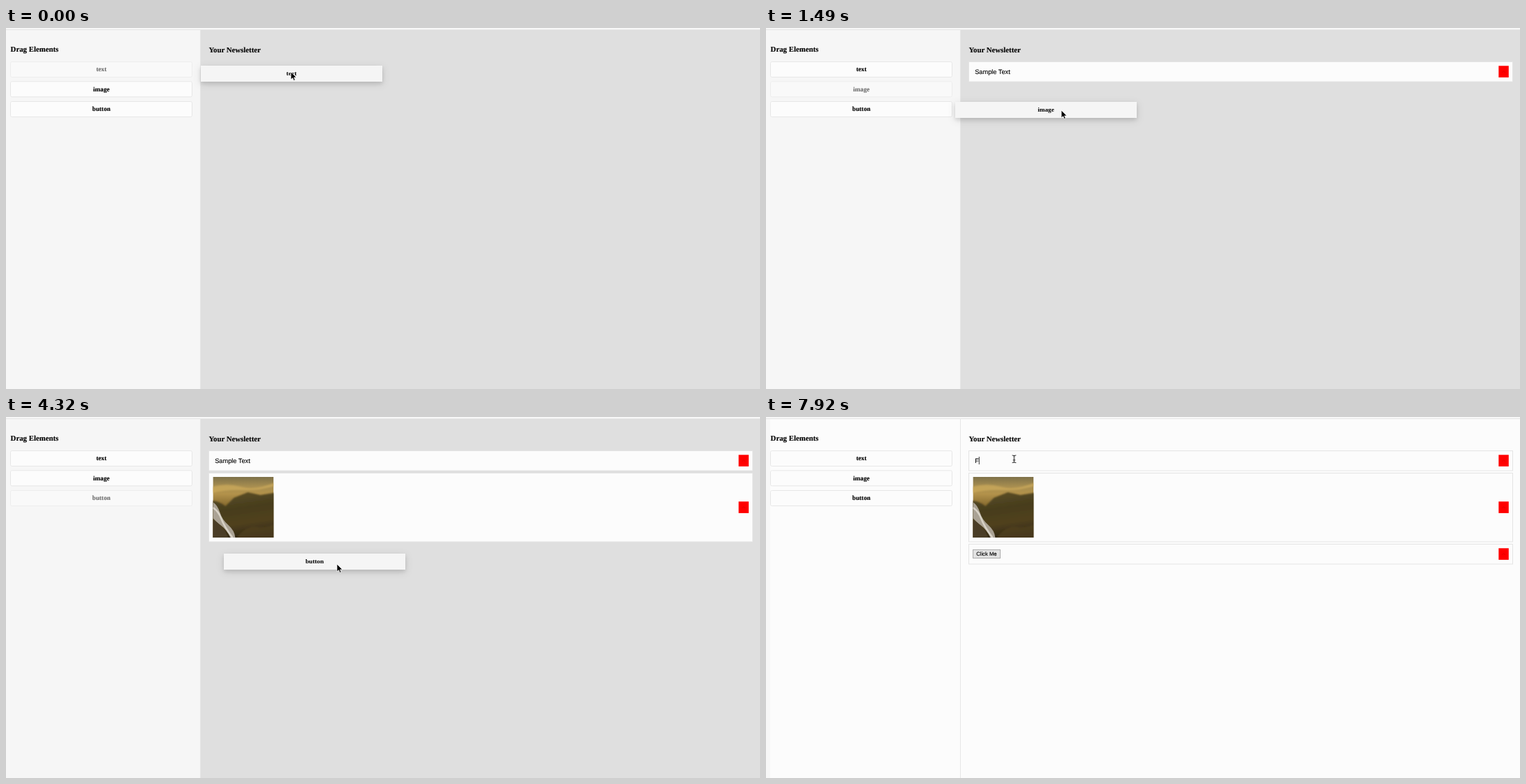
Write an HTML page that moves like this. It is 1080 px wide and 518 px high and loops after 8 s.

```html
<!DOCTYPE html>
<html lang="en">
<head>
<meta charset="utf-8">
<title>Newsletter builder</title>
<style>
html, body { margin: 0; width: 100%; height: 100%; overflow: hidden; background: #f7f7f7; }
svg { display: block; position: absolute; left: 0; top: 0; }
text { text-rendering: geometricPrecision; fill: #000; stroke: #000; stroke-width: .12px; }
.serif { font: bold 9.23px "Liberation Serif", "Times New Roman", serif; }
.mid { text-anchor: middle; }
.title { font-size: 10.8px; }
.sans { font: 9.23px "Liberation Sans", Arial, sans-serif; }
.small { font-size: 7.69px; }
.item rect { fill: #fcfcfc; stroke: #e7e7e7; }
.row { fill: #fcfcfc; stroke: #e4e4e4; }
.ghost div {
  margin: 20px; width: 260px; height: 23px; background: #f5f5f5;
  font: bold 9.23px/23px "Liberation Serif", "Times New Roman", serif; text-align: center;
  box-shadow: 0 3px 6px rgba(0,0,0,.13), 0 3px 12px 2px rgba(0,0,0,.07);
}

.zone, .panel, .item, .ghost, .pic, .plain, .row1, .row2, .row3,
.cursor, .arrow, .hand, .beam, .sample, .typed, .selTail, .selHead {
  animation: 8s step-end infinite;
}
.zone { animation-name: zone; }
.panel { animation-name: panel; }
.item1 { animation-name: fade1; }
.item2 { animation-name: fade2; }
.item3 { animation-name: fade3; }
.ghost1 { animation-name: drag1; }
.ghost2 { animation-name: drag2; }
.ghost3 { animation-name: drag3; }
.row1 { animation-name: row1; }
.row2 { animation-name: row2; }
.plain { animation-name: plain; }
.pic { animation-name: pic; }
.row3 { animation-name: row3; }
.cursor { animation-name: move; }
.arrow { animation-name: arrow; }
.hand { animation-name: hand; }
.beam { animation-name: beam; }
.sample { animation-name: sample; }
.typed { animation-name: typed; }
.selTail { animation-name: selTail; }
.selHead { animation-name: selHead; }

@keyframes zone {
  0%, 16.75%, 48.5% { fill: #dfdfdf; }
  3.625%, 26.125% { fill: #fefefe; }
  59.625%, 100% { fill: #fcfcfc; }
}
@keyframes panel { 0% { fill: #f6f6f6; } 59.625%, 100% { fill: #fcfcfc; } }
@keyframes fade1 { 0% { opacity: .55; } 3.625%, 100% { opacity: 1; } }
@keyframes fade2 { 0%, 26.125%, 100% { opacity: 1; } 16.75% { opacity: .55; } }
@keyframes fade3 { 0%, 59.625%, 100% { opacity: 1; } 48.5% { opacity: .55; } }
@keyframes drag1 { 0% { opacity: 1; } 3.625%, 100% { opacity: 0; } }
@keyframes drag2 { 0%, 26.125%, 100% { opacity: 0; } 16.75% { opacity: 1; } }
@keyframes drag3 { 0%, 59.625%, 100% { opacity: 0; } 48.5% { opacity: 1; } }
@keyframes row1 { 0% { opacity: 0; } 3.625%, 100% { opacity: 1; } }
@keyframes row2 { 0% { opacity: 0; } 26.125%, 100% { opacity: 1; } }
@keyframes plain { 0% { opacity: 1; } 31.75%, 100% { opacity: 0; } }
@keyframes pic { 0% { opacity: 0; } 31.75%, 100% { opacity: 1; } }
@keyframes row3 { 0% { opacity: 0; } 59.625%, 100% { opacity: 1; } }
@keyframes sample { 0% { opacity: 1; } 99%, 100% { opacity: 0; } }
@keyframes typed { 0% { opacity: 0; } 99%, 100% { opacity: 1; } }
@keyframes selTail { 0%, 99%, 100% { opacity: 0; } 85.875% { opacity: 1; } }
@keyframes selHead { 0%, 99%, 100% { opacity: 0; } 87.75% { opacity: 1; } }
@keyframes arrow {
  0%, 16.75%, 48.5% { opacity: 1; }
  3.625%, 26.125%, 59.625%, 100% { opacity: 0; }
}
@keyframes hand {
  0%, 16.75%, 48.5%, 82.125%, 100% { opacity: 0; }
  3.625%, 26.125%, 59.625% { opacity: 1; }
}
@keyframes beam { 0% { opacity: 0; } 82.125%, 100% { opacity: 1; } }
@keyframes move {
  0% { transform: translate(408px, 63px); }
  1.875% { transform: translate(409px, 63px); }
  3.625% { transform: translate(408px, 63px); }
  7.375% { transform: translate(340px, 61px); }
  9.25% { transform: translate(215px, 82px); }
  11.125% { transform: translate(158px, 90px); }
  16.75% { transform: translate(174px, 91px); }
  18.625% { transform: translate(423px, 118px); }
  20.5% { transform: translate(436px, 108px); }
  22.375% { transform: translate(441px, 102px); }
  24.25%, 26.125% { transform: translate(443px, 100px); }
  29.875% { transform: translate(400px, 102px); }
  31.75% { transform: translate(330px, 109px); }
  33.625% { transform: translate(255px, 117px); }
  35.5% { transform: translate(200px, 121px); }
  37.375% { transform: translate(174px, 120px); }
  39.125% { transform: translate(167px, 119px); }
  48.5% { transform: translate(312px, 140px); }
  50.375% { transform: translate(430px, 184px); }
  52.25% { transform: translate(468px, 205px); }
  54%, 59.625% { transform: translate(474px, 211px); }
  74.625% { transform: translate(460px, 200px); }
  76.5% { transform: translate(438px, 160px); }
  78.375% { transform: translate(405px, 104px); }
  80.25% { transform: translate(376px, 66px); }
  82.125% { transform: translate(350px, 50px); }
  84% { transform: translate(354px, 57px); }
  85.875%, 100% { transform: translate(355px, 60px); }
}
</style>
</head>
<body>
<svg width="1080" height="518" viewBox="0 0 1080 518">
  <defs>
    <linearGradient id="sky" x2="0" y2="1">
      <stop offset="0" stop-color="#7d7048"/>
      <stop offset=".15" stop-color="#a68d50"/>
      <stop offset=".28" stop-color="#b3924b"/>
      <stop offset=".5" stop-color="#80652c"/>
    </linearGradient>
    <linearGradient id="hill" x2=".2" y2="1">
      <stop offset="0" stop-color="#5f5128"/>
      <stop offset=".4" stop-color="#473d1d"/>
      <stop offset=".7" stop-color="#51411f"/>
      <stop offset="1" stop-color="#2f2612"/>
    </linearGradient>
    <filter id="soft" x="-.1" y="-.1" width="1.2" height="1.2"><feGaussianBlur stdDeviation="1"/></filter>
    <clipPath id="frame"><rect width="87" height="87"/></clipPath>
    <g id="del">
      <rect x="1049.4" width="14.4" y=".3" height="16.6" fill="#f00"/>
      <path d="M1054.3 10L1056.6 7.6L1058.9 10" fill="none" stroke="#d40000" stroke-width=".7"/>
    </g>
  </defs>

  <rect width="1080" height="518" fill="#f7f7f7"/>
  <rect class="panel" x="6" y="3" width="272" height="515"/>
  <rect class="zone" x="278" y="3" width="802" height="515"/>
  <path d="M0 2.5H1080M278.5 3V518" stroke="#e6e6e6"/>

  <text class="serif title" x="6.6" y="34.2">Drag Elements</text>
  <text class="serif title" x="290.4" y="34.7">Your Newsletter</text>

  <g class="item item1">
    <rect x="6.5" y="48.5" width="260" height="22" rx="2"/>
    <text class="serif mid" x="136.6" y="62.1">text</text>
  </g>
  <g class="item item2">
    <rect x="6.5" y="76.8" width="260" height="22" rx="2"/>
    <text class="serif mid" x="136.6" y="90.7">image</text>
  </g>
  <g class="item item3">
    <rect x="6.5" y="105.5" width="260" height="22" rx="2"/>
    <text class="serif mid" x="136.6" y="119.3">button</text>
  </g>

  <g class="row1">
    <rect class="row" x="290.5" y="48.5" width="779" height="28.5"/>
    <use href="#del" y="54"/>
    <rect class="selTail" x="333" y="57" width="17" height="11" fill="#b3d7ff"/>
    <rect class="selHead" x="299" y="57" width="34" height="11" fill="#b3d7ff"/>
    <text class="sans sample" x="299.2" y="65.6">Sample Text</text>
    <g class="typed">
      <text class="sans" x="299.2" y="65.6">F</text>
      <path d="M305.3 57V68" stroke="#000" stroke-width=".8"/>
    </g>
  </g>

  <g class="row2">
    <g class="plain">
      <rect class="row" x="290.5" y="80.5" width="779" height="28.5"/>
      <use href="#del" y="86"/>
    </g>
    <g class="pic">
      <rect class="row" x="290.5" y="80.5" width="779" height="98.5"/>
      <use href="#del" y="121"/>
      <g transform="translate(296.4 86)" clip-path="url(#frame)">
        <rect width="87" height="87" fill="url(#sky)"/>
        <g filter="url(#soft)">
          <path d="M-4 15Q18 8 40 14T92 7V12Q66 20 42 19T-4 24Z" fill="#d2ae5e" opacity=".65"/>
          <path d="M-4 34Q8 34 18 42L30 30L50 22L68 26L92 22V92H-4Z" fill="url(#hill)"/>
          <path d="M30 92Q46 70 62 72T92 66V92Z" fill="#584520" opacity=".6"/>
        </g>
        <path d="M0 36Q7 41 10 51T22 69T32 87H25Q20 76 12 70T0 59Z" fill="#aaa294"/>
        <path d="M0 44Q8 49 12 60T28 87" fill="none" stroke="#d8d2c6" stroke-width="2.5"/>
        <path d="M0 61Q13 69 22 87H0Z" fill="#4a3d26"/>
      </g>
    </g>
  </g>

  <g class="row3">
    <rect class="row" x="290.5" y="182.5" width="779" height="28.5"/>
    <use href="#del" y="188"/>
    <rect x="296.5" y="190.5" width="39" height="12" fill="#e2e2e2" stroke="#adadad"/>
    <text class="sans small mid" x="315.9" y="199.2">Click Me</text>
  </g>

  <g class="cursor">
    <foreignObject class="ghost ghost1" x="-149" y="-29.5" width="300" height="65"><div>text</div></foreignObject>
    <foreignObject class="ghost ghost2" x="-172" y="-32" width="300" height="65"><div>image</div></foreignObject>
    <foreignObject class="ghost ghost3" x="-182" y="-35" width="300" height="65"><div>button</div></foreignObject>
    <path class="arrow" d="M0 0V11L2.6 8.7L4.2 12.4L6.2 11.6L4.6 8H8Z" stroke="#fff" stroke-width=".8"/>
    <g class="hand">
      <g transform="translate(2.3 1)" stroke="#000" stroke-linejoin="round" stroke-linecap="round">
        <path d="M-5.3.8C-6-.6-4.5-1.2-3.4.4L-4.2-3.2C-4.5-4.9-3-5.1-2.5-3.7C-2.6-6-.8-6.4-.3-4.6C0-6.4 1.8-6.2 2-4.2C2.6-5.4 4.4-5 4.2-3C5-3.6 5.8-2.8 5.6-1.6C5.4 1 4.6 2.4 4 5.8H-2.2C-3 3.6-4.4 2.6-5.3.8Z" fill="#fff"/>
        <path d="M-2.5-3.7L-1.9-.8M-.3-4.6V-1M2-4.2L1.8-.9M4.2-3L3.8-.8" fill="none" stroke-width=".8"/>
      </g>
    </g>
    <path class="beam" d="M-2.6-5Q-.6-5 0-4Q.6-5 2.6-5M0-4V4.6M-2.6 5.6Q-.6 5.6 0 4.6Q.6 5.6 2.6 5.6M-1.4 1.8H1.4" transform="translate(.4 0)" fill="none" stroke="#000"/>
  </g>
</svg>
</body>
</html>
```
